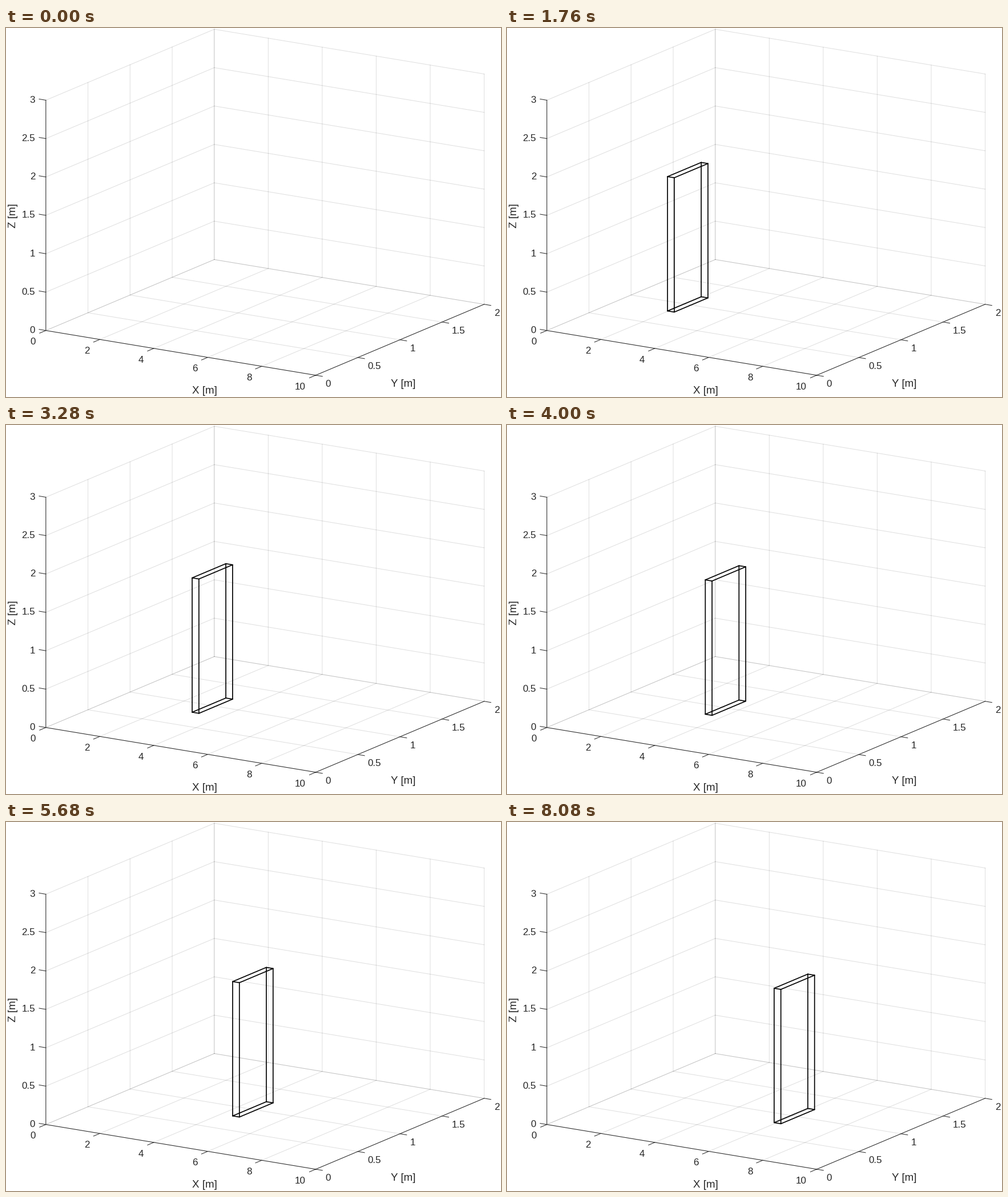
Recreate the animation shown at these times as a matplotlib script. Size 867 by 646 pixels, loop 8.16 s.

```python
import itertools

import matplotlib.pyplot as plt
import numpy as np
from matplotlib.animation import FuncAnimation
from matplotlib.collections import LineCollection

W, H, DPI = 867, 646, 64
PT = 72 / DPI  # points per pixel
FRAMES, INTERVAL = 102, 80
INK = "#262626"

# Orthographic projection: pixel position of the origin, pixels per metre
ORIGIN = np.array([69.8, 529.6])
AXES = np.array([[47.27, 7.83], [147.5, -62.1], [0, -134.4]])

XT = np.arange(0, 11, 2)
YT = np.arange(0, 2.1, 0.5)
ZT = np.arange(0, 3.1, 0.5)

plt.rcParams["font.family"] = "Liberation Sans"
fig = plt.figure(figsize=(W / DPI, H / DPI), dpi=DPI, facecolor="white")
ax = fig.add_axes([0, 0, 1, 1])
ax.set_xlim(0, W)
ax.set_ylim(H, 0)
ax.axis("off")


def project(p):
    return ORIGIN + np.asarray(p, float) @ AXES


def lines(segs, color, width, alpha=1, z=1):
    lc = LineCollection(segs, colors=color, linewidths=width * PT, alpha=alpha,
                        capstyle="projecting", zorder=z)
    lc.set_snap(False)
    ax.add_collection(lc)
    return lc


def label(x, y, s, ha, size=17, **kw):
    ax.text(x, y, s, ha=ha, va="baseline", fontsize=size * PT, color=INK, **kw)


def seg(a, b):
    return project([a, b])


# Each plane carries its own grid, so shared edges come out darker
grid = []
grid += [seg((0, y, 0), (0, y, 3)) for y in YT]
grid += [seg((0, 0, z), (0, 2, z)) for z in ZT]
grid += [seg((x, 2, 0), (x, 2, 3)) for x in XT]
grid += [seg((0, 2, z), (10, 2, z)) for z in ZT]
grid += [seg((x, 0, 0), (x, 2, 0)) for x in XT]
grid += [seg((0, y, 0), (10, y, 0)) for y in YT]
lines(grid, INK, 1, alpha=0.15)

rulers = [seg((0, 0, 0), (0, 0, 3)),
          seg((0, 0, 0), (10, 0, 0)),
          seg((10, 0, 0), (10, 2, 0))]


def ruler(points, values, tick, shift, ha):
    for p, v in zip(points, values):
        base = project(p)
        rulers.append([base, base + tick])
        label(*(base + shift), f"{v:g}", ha)


ruler([(0, 0, z) for z in ZT], ZT, (-11.8, -2), (-18.6, 4.3), "right")
ruler([(x, 0, 0) for x in XT], XT, (-11, 4.6), (-17.6, 24.7), "right")
ruler([(10, y, 0) for y in YT], YT, (11.8, 2), (17.3, 20.3), "left")
lines(rulers, INK, 1, z=2)

label(348, 640, "X [m]", "center", 18.7)
label(696, 628.3, "Y [m]", "center", 18.7)
label(16.6, 328.5, "Z [m]", "center", 18.7, rotation=90, rotation_mode="anchor")

# Walking box, its twelve edges join corners that differ in one coordinate
SIZE = np.array([0.25, 0.4, 1.75])
corners = list(itertools.product((0, 1), repeat=3))
edges = np.array([(a, b) for a, b in itertools.combinations(corners, 2)
                  if sum(abs(i - j) for i, j in zip(a, b)) == 1])
box = lines([], "black", 1.7, z=3)
box.set_capstyle("round")


def update(n):
    box.set_visible(n > 0)
    corner = np.array([1 + 0.05 * n - SIZE[0] / 2, 1 - SIZE[1] / 2, 0])
    box.set_segments(project(corner + edges * SIZE))
    return [box]


anim = FuncAnimation(fig, update, frames=FRAMES, interval=INTERVAL,
                     repeat=True, repeat_delay=0)
plt.show()
```
